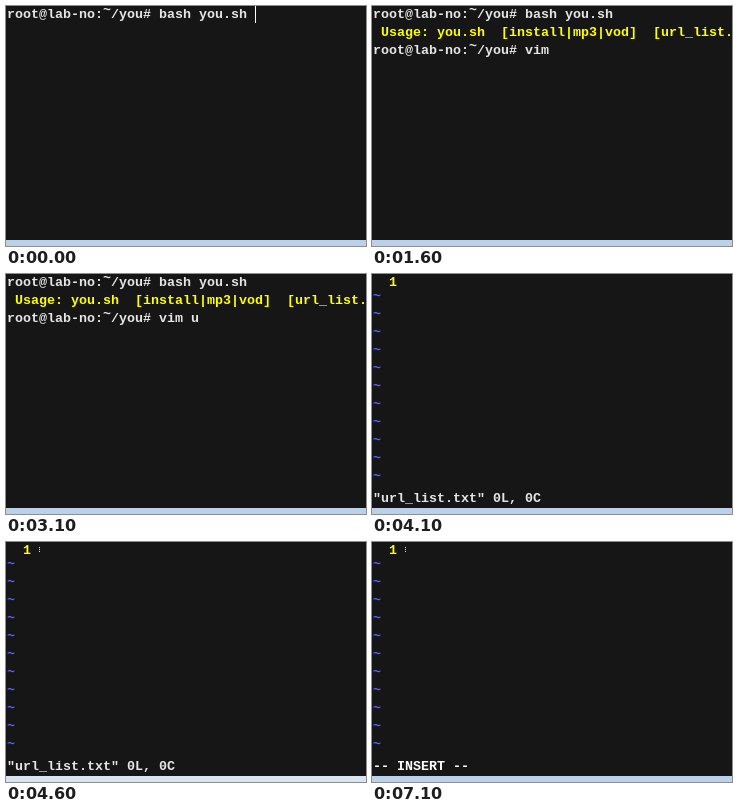
Animation, 360 px wide and 240 px high, one loop 8000 ms. Source, as an HTML page:

```html
<!DOCTYPE html>
<html lang="en">
<head>
<meta charset="utf-8">
<title>Terminal</title>
<style>
html, body { margin: 0; width: 100%; height: 100%; overflow: hidden; background: #161616; }
svg { display: block; width: 100vw; height: 100vh; }
text {
  font: bold 13.333px "Liberation Mono", "DejaVu Sans Mono", monospace;
  white-space: pre;
}
</style>
</head>
<body>
<svg id="stage" viewBox="0 0 360 240"></svg>
<script>
const LOOP = 8000, CELL = 8, LINE = 18, TILDE_LIFT = 4;
const GREY = '#e5e5e5', YELLOW = '#ffff00', BLUE = '#5c5cff', WHITE = '#ffffff';
const PROMPT = 'root@lab-no:~/you# ';
const stage = document.getElementById('stage');

function add(tag, attrs, parent = stage) {
  const el = document.createElementNS('http://www.w3.org/2000/svg', tag);
  for (const key in attrs) el.setAttribute(key, attrs[key]);
  return parent.appendChild(el);
}

// One line of terminal text; tildes sit high in this typeface.
function print(parent, row, fill, content, col = 0) {
  const el = add('text', { x: 1 + col * CELL, y: 12 + row * LINE, fill }, parent);
  content.split(/(~)/).filter(Boolean).forEach((part, i) => {
    const dy = part === '~' ? -TILDE_LIFT : i ? TILDE_LIFT : 0;
    add('tspan', { dy }, el).textContent = part;
  });
  return el;
}

const rect = (parent, x, y, width, height, fill) =>
  add('rect', { x, y, width, height, fill }, parent);

rect(stage, 0, 0, 360, 240, '#161616');

const shell = add('g', {});
print(shell, 0, GREY, PROMPT + 'bash you.sh');
const caret = rect(shell, 249, 0, 1, 17, WHITE);
const output = add('g', {}, shell);
print(output, 1, YELLOW, ' Usage: you.sh  [install|mp3|vod]  [url_list.txt]');
print(output, 2, GREY, PROMPT);
const command = print(output, 2, GREY, '', PROMPT.length);

const editor = add('g', {});
print(editor, 0, YELLOW, '1', 2);
for (let row = 1; row <= 11; row++) print(editor, row, BLUE, '~');
const pointer = add('g', {}, editor);
for (const y of [5, 7, 9]) rect(pointer, 33, y, 1, 1, GREY);
const fileInfo = print(editor, 12, GREY, '"url_list.txt" 0L, 0C');
const mode = print(editor, 12, WHITE, '-- INSERT --');

const border = rect(stage, 0, 234, 360, 6, '#b9d1ea');

const show = (el, on) => el.setAttribute('visibility', on ? 'inherit' : 'hidden');

function typed(t) {
  if (t < 1600) return '';
  if (t < 3100) return 'vim';
  return t < 3600 ? 'vim u' : 'vim url_list.txt';
}

function render(t) {
  show(shell, t < 4100);
  show(caret, t < 100);
  show(output, t >= 100);
  command.textContent = typed(t);
  show(editor, t >= 4100);
  show(pointer, t >= 4600);
  show(fileInfo, t < 7100);
  show(mode, t >= 7100);
  border.setAttribute('fill', t >= 4600 && t < 5600 ? '#d7e4f2' : '#b9d1ea');
}

const start = performance.now();
function tick() {
  render((performance.now() - start) % LOOP);
  requestAnimationFrame(tick);
}
tick();
</script>
</body>
</html>
```
